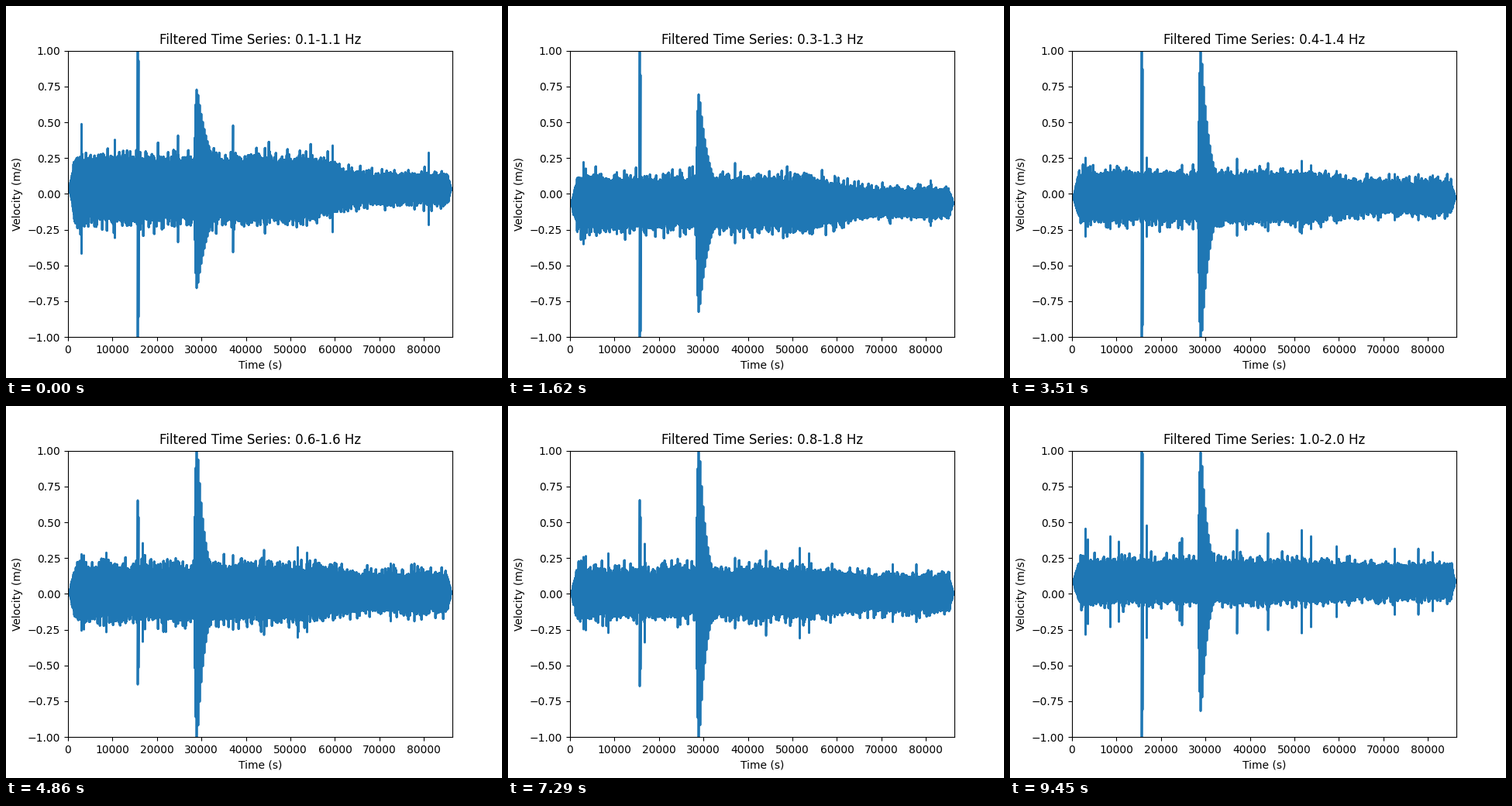
Recreate the animation shown at these times as a matplotlib script. Size 640 by 480 pixels, loop 9.72 s.

```python
import numpy as np
import matplotlib.pyplot as plt
from matplotlib.animation import FuncAnimation

plt.rcParams["font.family"] = "DejaVu Sans"
plt.rcParams["path.simplify"] = False

FRAMES, INTERVAL = 36, 270
SPAN = 86400            # seconds shown
WIDTH = 496             # axes width in pixels
PAD = 0.007             # half the line width in data units
DRIFT = 6               # steps between two independent sets of noise

# Bursts that stand out in the low and in the high bands: column -> strength
LOW_BURSTS = {17.5: .46, 60.5: .35, 142: .38, 213: .45, 341.5: .31, 465.5: .26}
HIGH_BURSTS = {20.5: .28, 49.5: .30, 96.5: .37, 139: .26, 253: .32,
               296.5: .34, 308.5: .30, 416.5: .22, 447: .22}

cols = np.arange(0, WIDTH, 0.5)
times = np.repeat(cols * SPAN / WIDTH, 2)
rng = np.random.default_rng(4)
grain = rng.gumbel(size=(FRAMES // DRIFT + 2, 2, WIDTH)).clip(-1.5, 5)


def taper(dist, width):
    return np.sin(np.pi / 2 * np.clip(dist / width, 0, 1)) ** 2


ends = taper(cols, 11) * taper(WIDTH - cols, 8)
late = taper(cols - 295, 95)


def noise(i):
    """Upper and lower noise peaks, drifting from one seeded set to the next."""
    early_level = np.interp(i, [0, 9, 18, 35], [.25, .17, .21, .165])
    late_level = np.interp(i, [0, 9, 18, 35], [.12, .11, .15, .135])
    level = early_level + (late_level - early_level) * late
    k, u = divmod(i / DRIFT, 1)
    u = np.clip(u, 1e-9, 1 - 1e-9)
    a, b = grain[int(k)], grain[int(k) + 1]
    g = np.maximum(a + np.log(1 - u), b + np.log(u))
    return ends * (level * (0.84 + 0.1 * np.repeat(g, 2, axis=1)) - PAD)


def peaks(i):
    """Columns and heights of everything that rises above the noise."""
    low = np.interp(i, [0, 3, 31, 35], [1, .65, .55, .82])
    high = np.interp(i, [3, 18, 31, 35], [.4, .95, .95, 1.08])
    for col, strength in LOW_BURSTS.items():
        yield col, strength * low
    for col, strength in HIGH_BURSTS.items():
        yield col, strength * high

    shock = np.interp(i, [13, 18, 31, 35], [1.1, .65, .66, 1.1])
    yield 90, shock
    yield 91, shock * 0.82

    quake = np.interp(i, [0, 9, 13, 31, 35], [.7, .8, 1.03, 1.03, .91])
    fade = np.interp(i, [0, 9, 35], [18, 11, 9])
    yield 163.5, quake * 0.52
    yield 164.5, quake * 0.85
    for col in range(166, 190, 2):
        yield col, quake * min(1, np.exp((167 - col) / fade))


def trace(i):
    centre = np.interp(i, [0, 3, 9, 18, 23, 31, 35],
                       [.035, -.08, -.05, .01, -.02, .03, .085])
    sides = noise(i)
    for col, height in peaks(i):
        n = round(col * 2)
        sides[:, n] = np.maximum(sides[:, n], height - PAD)
    up, down = sides
    return np.column_stack([centre + up, centre - down]).ravel().clip(-1, 1)


fig, ax = plt.subplots(figsize=(6.4, 4.8), dpi=100)
ax.set(xlim=(0, SPAN), ylim=(-1, 1), xlabel="Time (s)", ylabel="Velocity (m/s)")
line, = ax.plot([], [], lw=2, color="#1f77b4")
title = ax.set_title("")


def update(i):
    low = 0.1 + 0.9 * i / (FRAMES - 1)
    title.set_text(f"Filtered Time Series: {low:.1f}-{low + 1:.1f} Hz")
    line.set_data(times, trace(i))
    return line, title


anim = FuncAnimation(fig, update, frames=FRAMES, interval=INTERVAL,
                     init_func=lambda: update(0), repeat=True)
plt.show()
```
